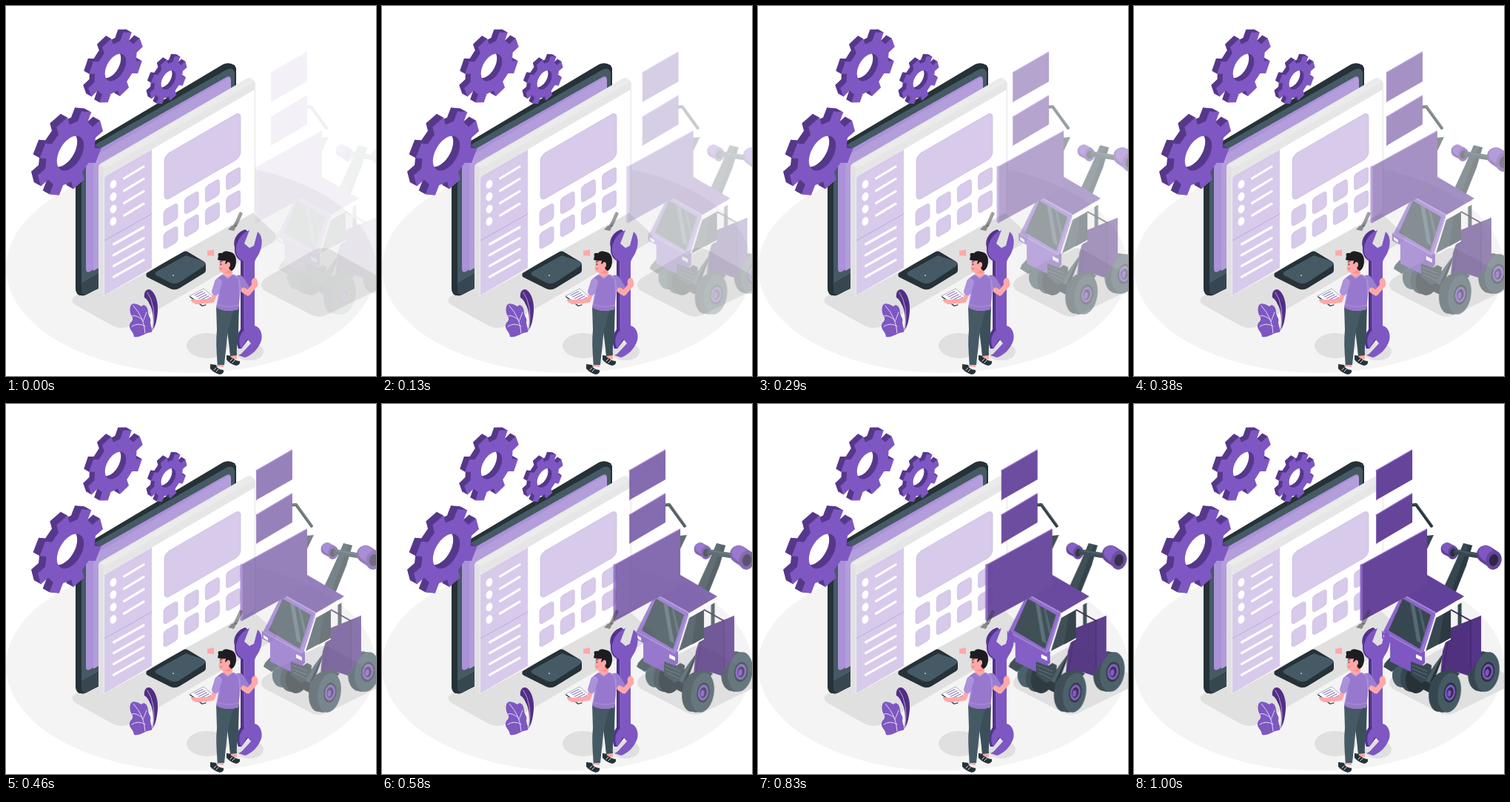
An HTML page with a canvas for the animation above (1.04 s loop, 500 by 500 pixels).

```html
<!DOCTYPE html>
<html lang="en">
<head>
<meta charset="utf-8">
<title>Workshop</title>
<style>
html, body { margin: 0; width: 100%; height: 100%; overflow: hidden; background: #fff; }
canvas { display: block; width: 500px; height: 500px; }
</style>
</head>
<body>
<canvas id="stage" width="500" height="500"></canvas>
<script>
const LOOP = 1040, STEPS = 25, SLIDE = 31;
const DARK = '#263238', SLATE = '#37474f', STEEL = '#455a64';
const PURPLE = '#7e57c2', DEEP = '#65449a', NIGHT = '#50378a', LILAC = '#b39ddb', PALE = '#d7caea', SKIN = '#ffa8a7';

const stage = document.getElementById('stage').getContext('2d');
let c;

function layer(draw) {
  const el = document.createElement('canvas');
  el.width = el.height = 500;
  c = el.getContext('2d');
  c.lineJoin = c.lineCap = 'round';
  draw();
  return el;
}

// Filled path, with an optional outline
function fill(color, d, edge, width = 1) {
  const p = new Path2D(d);
  c.fillStyle = color;
  c.fill(p);
  if (edge) {
    c.strokeStyle = edge;
    c.lineWidth = width;
    c.stroke(p);
  }
}

function line(color, width, d) {
  c.strokeStyle = color;
  c.lineWidth = width;
  c.stroke(new Path2D(d));
}

function oval(color, x, y, rx, ry, tilt = 0) {
  c.fillStyle = color;
  c.beginPath();
  c.ellipse(x, y, rx, ry, tilt, 0, 7);
  c.fill();
}

// Rounded rectangle on the left isometric plane
function tile(x, y, w, h, r) {
  c.save();
  c.transform(1, -0.577, 0, 1, x, y);
  c.beginPath();
  c.roundRect(0, 0, w, h, r);
  c.fillStyle = PALE;
  c.fill();
  c.strokeStyle = '#c9b9e4';
  c.lineWidth = 0.6;
  c.stroke();
  c.restore();
}

function gearPath(x, y, r, hole, phase) {
  const p = new Path2D(), steps = [[-13, 0.77], [-10, 1], [10, 1], [13, 0.77]];
  const put = (deg, k, first) => {
    const a = deg * Math.PI / 180, u = Math.cos(a) * r * k, v = Math.sin(a) * r * k;
    p[first ? 'moveTo' : 'lineTo'](x + u * 0.866, y + v - u * 0.5);
  };
  for (let i = 0; i < 8; i++) steps.forEach(([d, k], j) => put(phase + i * 45 + d, k, !i && !j));
  p.closePath();
  for (let d = 0; d <= 360; d += 6) put(d, hole / r, !d);
  p.closePath();
  return p;
}

function gear(x, y, r, hole, phase, dx, dy) {
  for (let i = 12; i >= 0; i--) {
    c.fillStyle = i ? '#56388b' : PURPLE;
    c.fill(gearPath(x + dx * i / 12, y + dy * i / 12, r, hole, phase), 'evenodd');
  }
}

function floor() {
  oval('#f4f4f4', 250, 354, 250, 142);
  const grey = '#e0e0e0';
  fill(grey, 'M92 393L300 276Q316 268 332 278L360 304Q372 313 358 321L170 431Q156 439 142 431L94 404Q86 399 92 393Z');
  fill(grey, 'M350 368L414 331Q428 323 442 331L520 375L438 415Q424 424 410 416L350 385Q340 377 350 368Z');
  oval(grey, 272, 459, 28, 17);
  oval(grey, 329, 467, 19, 12);
}

function monitor() {
  fill(DARK, 'M94 212Q94 198 107 190L293 79Q301 75 309 80L311 84V260L126 381L106 391Q94 393 94 381Z');
  fill(STEEL, 'M102 214Q102 199 114 191L298 86Q307 82 309 90V270L108 390Q102 391 102 384Z');
  fill(DARK, 'M94 373L102 375L126 361V381L106 391Q94 393 94 381Z');
  fill(SLATE, 'M102 375L126 361V380L109 390Q102 391 102 384Z');
  fill('#ab91d8', 'M108 213Q108 204 116 199L298 96Q304 93 304 101V250L113 359Q108 361 108 355Z');
  fill(LILAC, 'M118 204L299 98Q304 96 304 103V250L118 358Z');

  fill(DARK, 'M190 361L239 332Q243 330 247 333L267 345Q270 347 270 351V357Q270 360 266 362L235 381Q229 385 222 382L192 367Q188 365 190 361Z');
  fill(STEEL, 'M205 358L243 337L267 345Q272 348 267 352L235 373Q229 377 222 374L203 364Q199 361 205 358Z');
  oval('#cfd8dc', 226, 364, 1.2, 0.8);
}

function page() {
  fill('#e2e2e2', 'M125 218Q125 214 129 212L326 98Q330 96 334 100L337 104V277L134 391L125 386Z');
  fill('#fff', 'M133 222L336 104V276Q336 278 333 280L133 391Z', '#f1f1f1', 0.8);
  fill('#e6e6e6', 'M133 220L332 104Q336 102 336 106V113L133 231Z');
  fill('#ebebeb', 'M126 215L327 98Q331 96 335 103L133 220Z');
  fill(PALE, 'M133 231L197 194V354L133 391Z');
  line('#bda9df', 1, 'M133 317L197 281');
  for (let i = 0; i < 4; i++) {
    const y = i * 16.7, z = i * 14.7;
    oval('#fff', 145, 241 + y, 4.2, 6, 0.35);
    line('#fff', 3.2, `M159.500 ${233 + y}L186 ${217 + y}`);
    line('#fff', 3.2, `M145.500 ${322 + z}L186 ${299 + z}`);
  }
  tile(214, 202, 103, 62, 7);
  for (let i = 0; i < 4; i++)
    for (let j = 0; j < 2; j++) tile(213 + i * 28.2, 276.5 - i * 16.2 + j * 31, 19, 22, 4);
  fill('#8a8a8a', 'M300 302L305 297L312 296L308 304Z');
}

function plant() {
  fill('#512f85', 'M187 394C186 385 191 381 196 384C204 390 207 406 204 421Q202 434 198 438C200 424 199 411 194 403Q191 396 187 394Z');
  line('#cbb9e6', 0.8, 'M191 387Q203 404 199 436');
  fill(PURPLE, 'M173 447C172 439 166 438 167 431C168 426 172 427 171 421C168 417 166 409 169 404C173 400 179 404 183 406C187 401 192 407 192 414C192 420 197 421 195 428C196 436 200 438 196 441C188 441 182 449 173 447Z');
  line('#e5daf4', 1, 'M172 405Q187 421 188 442M186 426Q176 416 170 419M188 433Q179 427 170 433M186 424L190 414');
}

function panel(x, y, w, h, rise) {
  const r = x + w, t = y - rise;
  fill(DEEP, `M${x} ${y}L${r} ${t}V${t + h}L${x} ${y + h}Z`);
  line('#8d6ac8', 1.2, `M${x} ${y}L${r - 0.5} ${t}`);
  line('#7855b0', 1, `M${x + 0.5} ${y}V${y + h}`);
}

function wheel(x, y, rx, ry, depth) {
  oval(SLATE, x - depth, y - 1, rx, ry, 0.16);
  oval(SLATE, x - depth / 2, y, rx, ry, 0.16);
  oval(STEEL, x, y, rx, ry, 0.16);
  oval(DARK, x + 1, y, rx * 0.55, ry * 0.5, 0.16);
  oval(PURPLE, x + 1, y, rx * 0.45, ry * 0.4, 0.16);
  oval('#33264f', x + 1, y, rx * 0.29, ry * 0.27, 0.16);
  oval(PURPLE, x, y + 1, rx * 0.16, ry * 0.17, 0.16);
}

function roller(x, y, dx, dy, r) {
  line('#5e3d94', r * 2, `M${x} ${y}L${x + dx} ${y + dy}`);
  line(PURPLE, r * 1.6, `M${x} ${y - 2}L${x + dx - 2} ${y + dy - 2}`);
}

function truck() {
  // lifting arm and rollers
  fill(SLATE, 'M445 188L457 191L449 218L433 258L418 249L434 214Z');
  fill('#2b3a41', 'M452 191L457 191L449 218L433 258L428 255Z');
  roller(423, 196, 6, 3, 8.5);
  oval(DEEP, 431, 201, 7, 9, 0.2);
  oval(DARK, 431, 201, 4, 5.5, 0.2);
  line(SLATE, 7, 'M435 200L472 206');
  line(STEEL, 2, 'M436 198L470 204');
  roller(475, 203, 9, 6, 12);
  oval(DEEP, 486, 211, 10.5, 13, 0.25);
  oval('#2d2545', 486, 211, 6, 8, 0.25);
  line(DARK, 4, 'M372 137L381 136L402 165');
  line(STEEL, 1, 'M376 135L382 136L403 164');
  fill(SLATE, 'M395 178L405 177L396 196Z');

  // far wheels
  oval(STEEL, 363, 365, 14, 18, 0.16);
  oval(SLATE, 375, 369, 15, 20, 0.16);
  oval(DARK, 382, 371, 15, 20, 0.16);
  fill(SLATE, 'M339 350L350 338L364 347L348 362L337 355Z');

  // rear body
  wheel(477, 362, 16.5, 27, 9);
  line(SLATE, 5, 'M440 262V305');
  fill('#4f317f', 'M427 303L469 286V340L451 367L436 362L414 366L417 334Z');
  fill('#553589', 'M455 293L469 286V340L456 360Z');
  line('#3c2768', 1, 'M455 293V356M427 303L417 365');
  line('#38234f', 2, 'M403 264L455 293');

  // cabin
  fill('#fff', 'M404 283L445 261V267L428 277V318L398 335L386 331Z');
  fill(SLATE, 'M408 289L428 278V316L394 334Z');
  fill('#2b3a41', 'M418 284L428 278V316L412 325Z');
  fill('#62419a', 'M391 228L446 260L407 283L362 256Z');
  fill('#8b66cb', 'M362 257L407 281V286L390 339L336 309Z');
  fill(SLATE, 'M363 263L401 285L386 331L344 306Z');
  fill('#566b75', 'M373 268L379 272L388 324L382 320Z');
  fill('#4d626c', 'M384 275L387 277L394 305L392 312Z');
  line('#a78bd7', 2, 'M362 257L407 282');
  fill(PURPLE, 'M335 307L388 336L393 334V350L378 364L346 348L346 323L335 317Z');
  line('#a78bd7', 1.2, 'M335 307L388 336L406 286');
  fill('#fff', 'M337 312L343 316V320L337 316ZM381 338L389 342V347L381 343Z');

  // bucket link
  fill(SLATE, 'M374 348L390 354L396 350L402 353L401 371L388 377L374 366Z');
  line('#5a6e78', 1, 'M376 353L396 361M376 358L396 366M378 363L394 371');
  fill(DARK, 'M417 338L415 348L399 390L391 386L401 360Z');
  fill(STEEL, 'M417 338L399 377L394 374L405 354Z');
  fill(SLATE, 'M413 365Q426 355 440 364L433 373L418 379L410 407L399 401L400 376Z');
  wheel(426, 390, 15.5, 27, 12);

  panel(327, 90, 49, 40, 28);
  panel(327, 150, 49, 39, 29);
  panel(308, 217, 88, 76, 48);
  fill('#8763c0', 'M305.500 217L308.500 216V294L305.500 292Z');
}

function wrench() {
  fill('#52338a', 'M317 341L329 338V437L317 442Z');
  fill('#52338a', 'M309 326C306 314 314 305 323 302L326 304L318 324L327 327L330 345H319C313 343 308 336 309 326Z');
  fill('#52338a', 'M317 437C310 446 311 456 314 463L318 463L328 450L326 436Z');
  fill(PURPLE, 'M321 345C311 340 308 331 313 319C316 311 323 305 329 303L322 321L329 327L335 324L340 305C347 310 347 323 343 332C341 338 336 342 336 347V432C344 434 347 444 345 452C341 464 332 472 323 475L314 472L318 470L331 456L326 450L318 463C313 455 315 444 322 438Z');
  line('#9673cf', 0.8, 'M322 346V437');
}

function shoe(x, y) {
  fill(DARK, `M${x} ${y}L${x + 8} ${y + 1}Q${x + 9} ${y + 7} ${x + 18} ${y + 8}Q${x + 19} ${y + 13} ${x + 13} ${y + 14}Q${x + 5} ${y + 12} ${x} ${y + 6}Z`);
  line('#fff', 0.9, `M${x + 5} ${y + 8}L${x + 8} ${y + 5}M${x + 8} ${y + 10}L${x + 11} ${y + 7}`);
}

function man() {
  fill(SKIN, 'M272 331L281 329V338L272 337Z');
  shoe(298, 472);
  shoe(276, 484);
  fill(SKIN, 'M285 476L295 477L294 488L285 487ZM302 466L312 466L312 478L304 475Z');
  fill('#3b4f59', 'M298 406H315Q314 436 314 446Q311 463 312 472L303 473Q300 443 296 420Z');
  fill(STEEL, 'M284 405L308 409Q300 436 299 447L295 485L286 485Q283 455 285 438Z');

  line('#9b7ed0', 13, 'M315 370L322 381');
  line(SKIN, 7, 'M321 384L327 388L337 376');
  fill(SKIN, 'M332 377Q330 368 337 367Q342 371 339 380Z');
  fill('#ac91dc', 'M282 374Q285 365 296 362L309 363Q318 368 317 381L314 410Q297 415 284 407L287 389Z');
  fill('#9878cd', 'M287 367L292 363L300 369L307 363L314 369L316 389L314 410Q297 415 285 408L289 389Z');
  line('#ac91dc', 1, 'M285 403Q301 409 314 404');

  fill('#fff', 'M248 392L267 382L281 394L266 406Z', '#607d8b', 0.6);
  line(DARK, 1.2, 'M249 393L265 405L270 404');
  for (let i = 0; i < 5; i++)
    line('#8c76bb', 1.1, `M${255 + i * 2.7} ${391 + i * 2.1}l11 -5.500`);
  line(SKIN, 6, 'M283 388L279 398L258 400');
  fill(SKIN, 'M250 396L260 397L264 402L257 403L251 400Z');
  line('#ac91dc', 10, 'M287 373L283 386');

  fill(SKIN, 'M293 355L306 352L306 363L299 367L293 362Z');
  fill(SKIN, 'M291 341Q287 348 288 357Q290 361 298 360Q307 357 307 346L300 337Z');
  fill('#ff918f', 'M294 360Q300 359 304 355L303 362Z');
  line('#242424', 1, 'M289 346l3 -1');
  oval('#242424', 290.5, 349, 0.8, 1.1);
  line('#d66', 0.9, 'M289 355l3 0');
  fill('#1d1d21', 'M287 338Q285 333 292 334Q295 330 301 332Q311 333 311 345Q311 354 305 358L302 356L300 347L296 349L297 344Q291 345 286 343Z');
  oval(SKIN, 300.5, 349.5, 2.5, 3.5);
}

const back = layer(() => {
  floor();
  monitor();
  page();
  gear(87, 199, 51, 21, -60, -9, -5);
  gear(148, 83, 43, 16.5, -64, -7, -4);
  gear(219.5, 100, 29, 11.5, -60, -5, -3);
  plant();
});
const ride = layer(truck);
const front = layer(() => {
  fill('rgba(60,60,60,.5)', 'M316 278L320 280L312 298L307 297Z');
  wrench();
  man();
});

function frame(now) {
  // the small lead lets whole 10 ms times reach their step
  const step = Math.floor(now % LOOP / LOOP * STEPS + 0.1);
  const left = Math.pow(Math.max(0, 1 - step / STEPS), 1.8);
  stage.globalAlpha = 1;
  stage.fillStyle = '#fff';
  stage.fillRect(0, 0, 500, 500);
  stage.drawImage(back, 0, 0);
  stage.globalAlpha = 1 - 0.93 * left;
  stage.drawImage(ride, SLIDE * left, 0);
  stage.globalAlpha = 1;
  stage.drawImage(front, 0, 0);
}

const start = performance.now();
function tick() {
  frame(performance.now() - start);
  requestAnimationFrame(tick);
}
tick();
</script>
</body>
</html>
```
